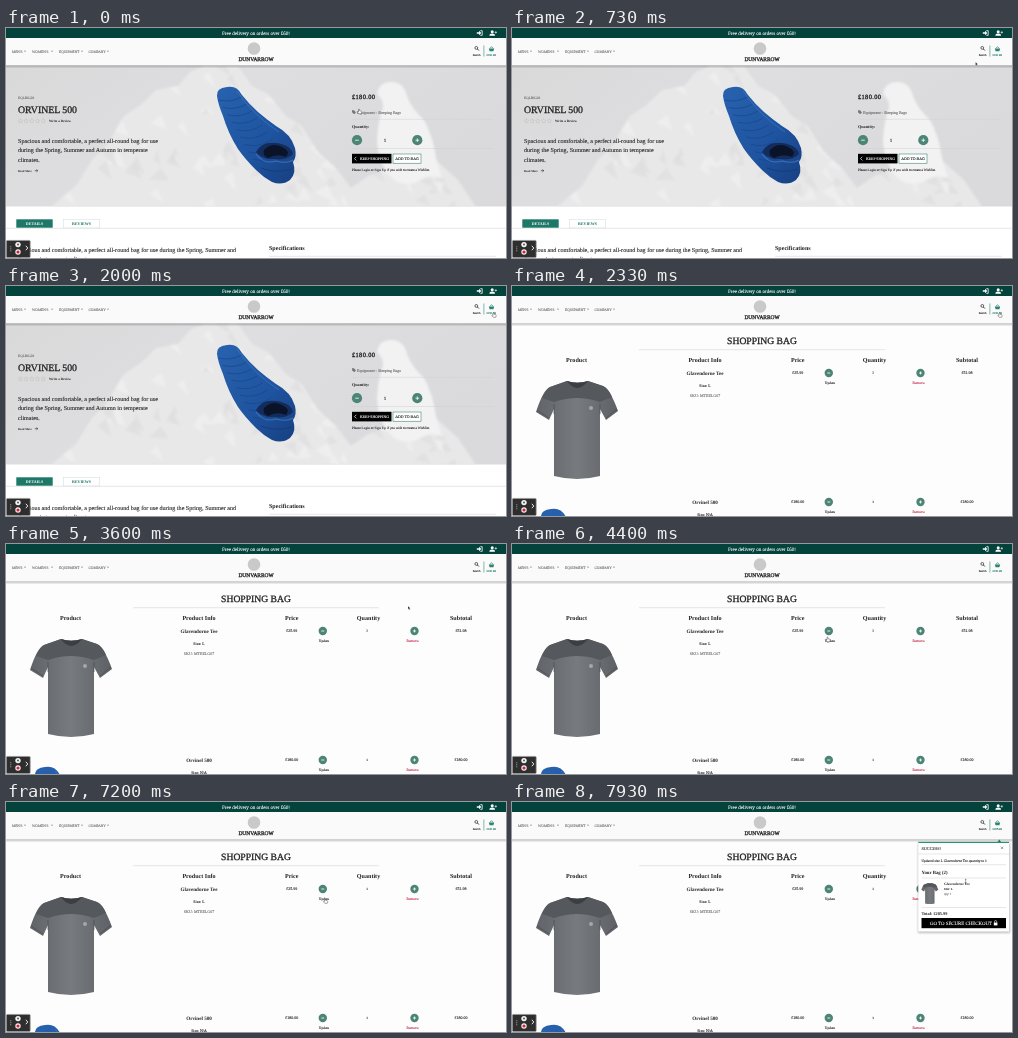
An HTML page for the animation above (8 s loop, 500x230 px).

```html
<!DOCTYPE html>
<html lang="en">
<head>
<meta charset="utf-8">
<title>Shop</title>
<style>
  html, body { margin: 0; width: 100%; height: 100%; overflow: hidden; background: #fff; }
  svg { display: block; width: 500px; height: 230px; }
  text {
    font-family: "Liberation Serif", serif; text-rendering: geometricPrecision;
    color: #222; fill: currentColor; stroke: currentColor; stroke-width: .1;
  }
  .m { text-anchor: middle; }
  .b { font-weight: bold; stroke-width: 0; }
  .h { stroke-width: .3; }
  .g { color: #6c6c6c; }
  .w { color: #fff; }
  .t { color: #17705f; }
  .r { color: #c22347; }
</style>
</head>
<body>
<svg id="stage" viewBox="0 0 500 230" xmlns="http://www.w3.org/2000/svg"></svg>
<script>
const text = (x, y, size, str, cls = '', extra = '') =>
  `<text x="${x}" y="${y}" font-size="${size}" class="${cls}" ${extra}>${str}</text>`;
const rect = (x, y, w, h, fill, extra = '') =>
  `<rect x="${x}" y="${y}" width="${w}" height="${h}" fill="${fill}" ${extra}/>`;
const circle = (x, y, r, fill, extra = '') => `<circle cx="${x}" cy="${y}" r="${r}" fill="${fill}" ${extra}/>`;
const path = (d, fill = 'none', extra = '') => `<path d="${d}" fill="${fill}" ${extra}/>`;
const line = (d, color, width = .5) => path(d, 'none', `stroke="${color}" stroke-width="${width}"`);
const rule = (x1, x2, y) => line(`M${x1} ${y}H${x2}`, '#cfcfcf');
const group = (id, body) => `<g id="${id}">${body}</g>`;
const use = (id, transform) => `<use href="#${id}" transform="${transform}"/>`;
const stepper = (x, y, r, plus) => circle(x, y, r, '#4c8575') +
  line(`M${x - r * .35} ${y}h${r * .7}` + (plus ? `M${x} ${y - r * .35}v${r * .7}` : ''), '#fff', .8);

let seed = 7;
const rand = (lo, hi) => {
  seed = seed * 16807 % 2147483647;
  return lo + (hi - lo) * seed / 2147483647;
};

const rock = 'M45 179L70 158L86 132L100 118L118 88L136 76L150 62L172 58L184 44L198 38H232L246 58L262 66L280 88L296 98L312 124L330 140L345 160L362 148L385 140L432 134L452 152L470 179Z';
const defs = `<defs>
  <linearGradient id="sky" x2="1" y2=".4">
    <stop stop-color="#d9d9da"/><stop offset=".45" stop-color="#dedee0"/><stop offset="1" stop-color="#dadadc"/>
  </linearGradient>
  <linearGradient id="blue" x2="1" y2="1">
    <stop stop-color="#2862ae"/><stop offset=".6" stop-color="#1e539f"/><stop offset="1" stop-color="#173f80"/>
  </linearGradient>
  <linearGradient id="cloth" x2="1">
    <stop stop-color="#606368"/><stop offset=".5" stop-color="#777a7e"/><stop offset="1" stop-color="#5d6065"/>
  </linearGradient>
  <linearGradient id="fade" x2="0" y2="1">
    <stop stop-color="#000" stop-opacity=".28"/><stop offset="1" stop-color="#000" stop-opacity="0"/>
  </linearGradient>
  <filter id="soft"><feGaussianBlur stdDeviation="1.1"/></filter>
  <clipPath id="hero">${rect(0, 37, 500, 141.5, '#000')}</clipPath>
  <clipPath id="cliff">${path(rock)}</clipPath>
  ${group('bag',
    path('M211 68Q210 60 221 59Q231 57 236 67Q243 76 252 84Q260 91 270 98Q285 106 289 120Q291 129 287 134Q291 145 284 152Q276 158 266 154Q257 149 250 142Q239 131 232 121Q222 105 217 88Q212 76 211 68Z', 'url(#blue)') +
    [0, 1, 2, 3, 4, 5, 6, 7, 8].map(i => line(
      `M${212.5 + i * 4.3} ${72 + i * 7.4}q${12 + i * .5} ${3 + i * .2} ${23 + i * .9} ${-3 - i * .4}`, '#174788', .7)).join('') +
    line('M231 63Q247 87 273 104', '#3f77c0', .7) +
    path('M250 124Q256 113 270 115Q285 117 287 126Q281 133 268 131Q256 132 250 124Z', '#142c5c') +
    path('M258 122Q266 114 276 119Q285 123 280 129Q271 125 262 130Q256 127 258 122Z', '#0a1328') +
    line('M250 126Q258 137 270 133Q281 136 287 132', '#3a70b8', 1.1) +
    line('M255 140Q270 146 286 141', '#143a78', .8))}
  ${group('shirt',
    path('M55 95Q65 99 76 95L91 100Q98 103 106 125L94 134L88 123V190Q65 196 42 190V123L37 134L24 126Q31 104 38 101Z', 'url(#cloth)') +
    path('M55 95Q65 99 76 95L91 100Q97 103 100 111L88 116Q65 108 42 116L30 112Q34 103 38 101Z', '#55585d') +
    path('M55 95Q65 109 76 95Q65 98 55 95Z', '#3b3e42') +
    line('M42 118V128M88 118V128M25 124L37 132M105 123L94 132', '#494c51', .7) +
    circle(79, 122, 2, '#a5a7aa'))}
</defs>`;

const header = rect(0, 37, 500, 3.5, 'url(#fade)') + rect(0, 10, 500, 27.3, '#fafafa') + rect(0, 0, 500, 10, '#04433b') +
  text(250, 7.2, 5.07, 'Free delivery on orders over £60!', 'm w') +
  // sign-in and register icons
  path('M470.8 4.2H473V2.8L475.3 5L473 7.2V5.8H470.8Z', '#fff') + line('M474.3 2.7H476.2V7.3H474.3', '#fff', .8) +
  circle(486.2, 3.7, 1.5, '#fff') + path('M483.4 7.8Q483.4 5.5 486.2 5.5Q489 5.5 489 7.8Z', '#fff') +
  line('M488.6 4.4H491M489.8 3.2V5.6', '#fff', .6) +
  [["MEN'S", 6, 18], ["WOMEN'S", 26, 45], ['EQUIPMENT', 53, 75], ['COMPANY', 82.5, 101]].map(([s, x, e]) =>
    text(x, 24.6, 3.55, s, 'g') + path(`M${e} 22.8h2l-1 1.2Z`, '#777')).join('') +
  circle(248, 20.5, 6.3, '#c9c9c9') +
  text(250, 33.2, 5.45, 'DUNVARROW', 'm h') +
  circle(470.3, 19.9, 1.4, 'none', 'stroke="#222" stroke-width=".7"') + line('M471.4 21L472.9 22.5', '#222', .9) +
  text(470.6, 27.7, 2.9, 'Search', 'm') + line('M477.9 17.5V28.5', '#17705f') +
  path('M482.8 20.4H488.2L487.4 23.2H483.6Z', '#2b8372') + line('M483.8 20.4L485 18.9H486L487.2 20.4', '#2b8372', .6) +
  text(485.3, 27.6, 2.9, '£231.98', 'm t', 'id="sum"');

const facets = Array.from({ length: 130 }, () => {
  const x = rand(45, 470), y = rand(38, 179);
  return path(`M${x} ${y}l${rand(3, 12)} ${rand(-14, -4)}l${rand(2, 9)} ${rand(6, 20)}Z`,
    rand(0, 1) < .5 ? '#dfdfe0' : '#f1f1f1', 'opacity=".7"');
}).join('');
const bird = 'M371 66Q373 53 387 54Q398 55 401 68Q405 80 418 92Q427 108 430 130L436 150Q424 146 414 152Q402 160 388 152Q372 138 371 112Q372 92 377 80Q378 72 371 66Z';

const blurb = 'Spacious and comfortable, a perfect all-round bag for use';
const star = x => path(`M${x} 90.6l.7 1.5 1.6.2-1.2 1.1.3 1.6-1.4-.8-1.4.8.3-1.6-1.2-1.1 1.6-.2Z`, 'none', 'stroke="#bbb" stroke-width=".4"');

const product = rect(0, 38, 500, 192, '#fff') +
  `<g clip-path="url(#hero)">${rect(0, 37, 500, 142, 'url(#sky)')}<g filter="url(#soft)">` +
  path(rock, '#e8e8e9') + `<g clip-path="url(#cliff)">${facets}</g>` + path(bird, '#f2f2f2') +
  '</g></g>' +
  text(12, 71.3, 3.5, 'EQLBIG03', 'g') + text(12, 85.4, 9.8, 'ORVINEL 500', 'h') +
  [14.5, 20.2, 25.9, 31.6, 37.3].map(star).join('') + text(43, 93.8, 3.35, 'Write a Review', 'b') +
  text(12, 115, 6.1, blurb) + text(12, 124.3, 6.1, 'during the Spring, Summer and Autumn in temperate') + text(12, 133.6, 6.1, 'climates.') +
  text(12, 143.7, 2.9, 'Read More', 'b') + line('M28.8 142.7H31.6M30.5 141.5L31.8 142.7L30.5 143.9', '#222', .6) +
  use('bag', '') +
  text(346, 71.3, 6.4, '£180.00', 'h', 'letter-spacing=".35"') +
  path('M346 82.3H348L350 84.4L348.2 86.3L346 84.2Z', '#777') +
  text(351, 85.7, 4, 'Equipment - Sleeping Bags', 'g') + rule(346, 488, 91.3) +
  text(346, 100.4, 4.2, 'Quantity:', 'b') + stepper(351, 112.2, 5.1) + text(379, 114, 5, '1', 'm') + stepper(411.3, 112.2, 5.1, true) +
  rule(346, 488, 120.5) +
  rect(346, 125.8, 39.5, 9.6, '#000') + line('M350.3 128.8L348.5 130.6L350.3 132.4', '#fff', .7) + text(354, 131.9, 3.8, 'KEEP SHOPPING', 'w') +
  rect(387, 126, 28, 9.2, '#fff', 'stroke="#17705f" stroke-width=".5"') + text(401, 131.9, 3.9, 'ADD TO BAG', 'm') +
  text(346, 143.2, 3.4, 'Please <tspan class="b">Login</tspan> or <tspan class="b">Sign Up</tspan> if you wish to create a Wishlist.') +
  rule(0, 500, 200.3) + rect(10.3, 191.3, 36.4, 8.4, '#1e7867') + text(28.5, 196.8, 4, 'DETAILS', 'm b w') +
  rect(57.3, 191.3, 36.5, 8.6, '#fff', 'stroke="#bfd8d2" stroke-width=".4"') + text(75.5, 196.8, 4, 'REVIEWS', 'm b t') +
  text(12, 223.7, 6.1, blurb + ' during the Spring, Summer and') + text(12, 233, 6.1, 'Autumn in temperate climates.') +
  text(263, 222, 6.05, 'Specifications', 'b') + rule(263, 490, 228.3);

const row = (y, name, size, price, total, id) =>
  text(193, y + 2, 5.1, name, 'm b') + text(193, y + 13.5, 3.95, 'Size: ' + size, 'm') +
  text(285.7, y + .6, 4, price, 'm') + stepper(316.8, y, 4.2) + text(318, y + 10.8, 3.6, 'Update', 'm') +
  text(361, y + 1.2, 3.4, '1', 'm', `id="${id}"`) + stepper(408.5, y, 4.2, true) +
  text(406.5, y + 10.8, 3.6, 'Remove', 'm r') + text(455, y + .6, 4, total, 'm');

const cart = rect(0, 37, 500, 193, '#fdfdfd') +
  text(250, 57.6, 9.65, 'SHOPPING BAG', 'm h') + rule(127, 373, 63.7) +
  [['Product', 64.5], ['Product Info', 193], ['Price', 285.7], ['Quantity', 362.5], ['Subtotal', 455]]
    .map(([s, x]) => text(x, 76, 6.1, s, 'm b')).join('') +
  use('shirt', '') + row(87, 'Glavendorne Tee', 'L', '£25.99', '£51.98', 'qty') +
  text(193, 110.8, 4, 'SKU: MTEELG07', 'm g') +
  row(216, 'Orvinel 500', 'N/A', '£180.00', '£180.00', 'qty2') + use('bag', 'translate(-182 164)');

const toast = rect(406, 41, 92, 90, '#000', 'opacity=".25" filter="url(#soft)"') +
  path('M485.5 40L487.3 37.6L489.1 40Z', '#17805f') + rect(406.3, 40, 90.7, 89.5, '#fff') + rect(406.3, 39.8, 90.7, 1.2, '#27966f') +
  text(409.5, 48, 4.2, 'SUCCESS!') + line('M488.9 44.7l2.4 2.4m0-2.4l-2.4 2.4', '#444') + rule(406.3, 497, 52) +
  text(409.5, 60, 3.55, 'Updated size L Glavendorne Tee quantity to 1') + rule(409.5, 494, 62.7) +
  text(409.5, 72.3, 4.8, 'Your Bag (2)', 'b') + rule(409.5, 494, 76) +
  use('shirt', 'translate(404.5 61) scale(.205 .213)') +
  text(432, 82.5, 3.55, 'Glavendorne Tee', 'b') + text(432, 87.8, 3, 'Size: L') + text(432, 92.7, 3, 'Qty: 1', 'g') +
  rule(409.5, 494, 105.5) + text(409.5, 112.6, 4.3, 'Total: £205.99', 'b') +
  rect(409.5, 116, 84.5, 10.2, '#000') + text(418, 122.7, 4.85, 'GO TO SECURE CHECKOUT', 'w') +
  rect(481.8, 120.6, 3.6, 2.8, '#fff') + line('M482.5 120.8V119.6Q482.5 118.6 483.6 118.6Q484.7 118.6 484.7 119.6V120.8', '#fff', .6);

const recorder = rect(.4, 212.4, 23.8, 17.2, '#2e2e2e', 'rx="1" stroke="#9a9a9a" stroke-width=".7"') +
  [0, 1, 2].map(i => circle(4.8, 218.8 + i * 2, .5, '#ccc')).join('') +
  circle(12, 216.6, 2.7, '#f4f4f4') + circle(12, 216.6, 1, '#555') +
  circle(12, 224, 2.7, '#f4f4f4') + circle(12, 224, 1.6, '#d8213f') +
  line('M19.8 217.8L21.8 220L19.8 222.2', '#fff', .9);

const cursors =
  group('arrow', path('M0 0V3.4L.8 2.7L1.4 4L2 3.7L1.4 2.5H2.5Z', '#111', 'stroke="#fff" stroke-width=".3"')) +
  group('hand', path('M-.5 .2Q0-.4 .4 .2V1.7L2.4 2.2Q2.9 2.4 2.7 3.2L2.2 4.8H-.2L-1.7 2.9Q-1.4 2.2-.5 2.9Z', '#fff', 'stroke="#222" stroke-width=".4"')) +
  group('beam', line('M-.8-2H.8M0-2V2M-.8 2H.8', '#333', .45));

const $ = id => document.getElementById(id);
$('stage').innerHTML = defs + group('product', product) + group('cart', cart) + header +
  group('toast', toast) + recorder + group('pointer', cursors);

// time, x, y, pointer shape from then on
const moves = [
  [0, 353, 81, 'hand'], [60, 353, 81, 'arrow'], [730, 463.5, 34, 'arrow'], [860, 470, 33, 'arrow'],
  [930, 470, 33, 'arrow'], [1200, 486.5, 27.5, 'hand'], [1800, 486.5, 27.5, 'hand'], [2000, 487.5, 26.5, 'hand'],
  [2800, 487.5, 26.5, 'arrow'], [3260, 402, 62, 'arrow'], [3600, 402, 62, 'arrow'], [4200, 320, 96, 'hand'],
  [4400, 315.5, 93, 'hand'], [5200, 317, 87, 'hand'], [6330, 317, 87, 'hand'], [6660, 318.5, 94, 'hand'],
  [6800, 318.5, 94, 'hand'], [6860, 319, 96.5, 'hand'], [7260, 319, 96.5, 'arrow'], [7860, 453.7, 79.3, 'beam']
];
const show = (id, on) => $(id).setAttribute('display', on ? 'inline' : 'none');

function draw(now) {
  const t = now % 8000;
  const i = moves.findLastIndex(m => m[0] <= t);
  const [t0, x0, y0, shape] = moves[i];
  const [t1, x1, y1] = moves[i + 1] || [8000, x0, y0];
  const u = (t - t0) / (t1 - t0), k = u * u * (3 - 2 * u);
  $('pointer').setAttribute('transform', `translate(${x0 + (x1 - x0) * k} ${y0 + (y1 - y0) * k})`);
  for (const id of ['arrow', 'hand', 'beam']) show(id, id === shape);

  const updated = t >= 7530;
  show('product', t < 2330);
  show('cart', t >= 2330);
  show('toast', updated);
  $('qty').textContent = t < 5260 ? 2 : 1;
  $('sum').textContent = updated ? '£205.99' : '£231.98';
  requestAnimationFrame(() => draw(performance.now()));
}
draw(performance.now());
</script>
</body>
</html>
```
